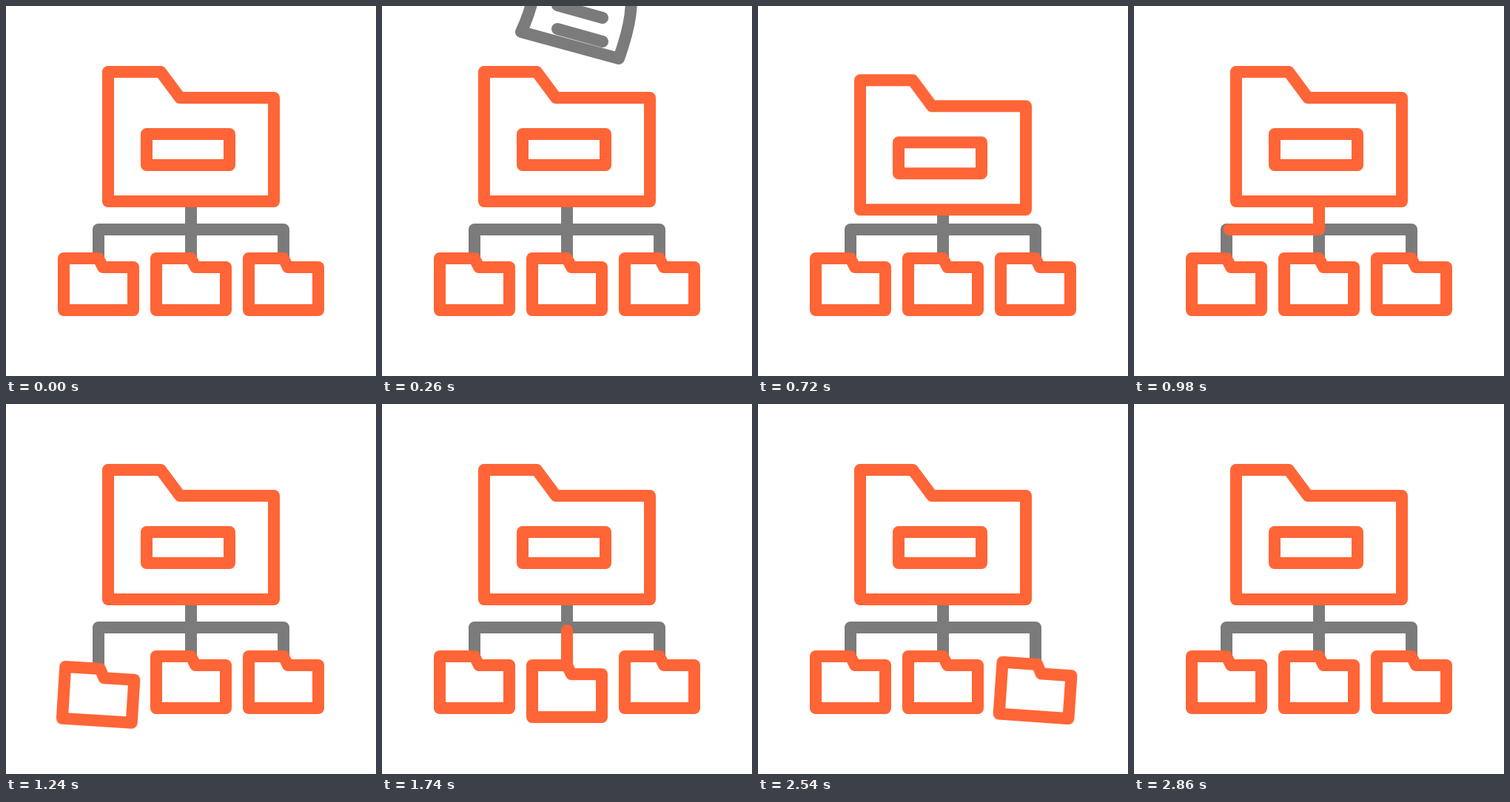
Recreate the animation shown at these times as an HTML page without scripts. Size 500 by 500 pixels, loop 3000 ms.

```html
<!DOCTYPE html>
<html lang="en">
<head>
<meta charset="utf-8">
<title>Folder tree</title>
<style>
  html, body { margin: 0; width: 100%; height: 100%; overflow: hidden; background: #fff; }
  svg { display: block; width: 100vw; height: 100vh; }
  path { fill: none; stroke-width: 16; stroke-linecap: round; stroke-linejoin: round; }
  .grey path { stroke: #7b7b7b; }
  .orange path { stroke: #ff6536; }
  path.solid, .solid path { fill: #fff; }

  /* Every part loops over 3 s and starts at its own delay. */
  .paper, .big, .dip, .tilt, .flow path {
    animation: 3s cubic-bezier(.37, 0, .63, 1) var(--at) infinite;
  }
  .paper { --at: 80ms; visibility: hidden; animation-name: fall; }
  .big { --at: 560ms; animation-name: bump; }
  .dip { animation-name: dip; }
  .tilt { animation-name: tilt; transform-origin: 125px 376px; }
  .last .dip { animation-name: dip-last; }
  .last .tilt { animation-name: tilt-last; }
  .flow path {
    stroke-dasharray: 100 300;
    stroke-dashoffset: 100;
    animation-name: flow;
    animation-timing-function: linear;
  }

  @keyframes fall {
    0% {
      visibility: visible; transform: translateY(-165px);
      animation-timing-function: cubic-bezier(.333, .25, .667, .583);
    }
    16% { visibility: visible; transform: translateY(105px); }
    16.01%, 100% { visibility: hidden; transform: translateY(105px); }
  }
  @keyframes bump {
    0%, 7.67%, 100% { transform: none; }
    3% { transform: translateY(23px); }
  }
  @keyframes dip {
    0%, 11.2%, 100% { transform: none; }
    4% { transform: translateY(27px); }
  }
  @keyframes tilt {
    0%, 2%, 22%, 100% { transform: rotate(0deg); }
    8.5% { transform: rotate(4deg); }
    18% { transform: rotate(-4deg); }
  }
  @keyframes dip-last {
    0%, 9.5%, 100% { transform: none; }
    3.83% { transform: translateY(31px); }
  }
  @keyframes tilt-last {
    0%, 1%, 17.83%, 100% { transform: rotate(0deg); }
    7% { transform: rotate(4deg); }
    13.9% { transform: rotate(-4deg); }
  }
  @keyframes flow {
    0% { stroke-dashoffset: 100; }
    4.5% { stroke-dashoffset: 0; }
    9%, 100% { stroke-dashoffset: -100; }
  }
</style>
</head>
<body>
<svg viewBox="0 0 500 500">
  <defs>
    <path id="folder" d="M78 341H125L131 353H172V411H78Z"/>
  </defs>

  <g class="grey">
    <path d="M250 264V375M125 375V302H375V375"/>
  </g>

  <g class="orange flow">
    <path style="--at:890ms" pathLength="100" d="M250 264V302H125V375"/>
    <path style="--at:1.555s" pathLength="100" d="M250 264V375"/>
    <path style="--at:2.192s" pathLength="100" d="M250 264V302H375V375"/>
  </g>

  <g class="grey paper">
    <path class="solid" d="M208 5L336 40C339 78 337 102 320 150L188 114C203 82 209 58 208 5Z"/>
    <path d="M237 46L298 62M237 78L298 95M237 110L298 127"/>
  </g>

  <g class="orange solid">
    <g class="big">
      <path d="M138 89H209L235 124H362V264H138Z"/>
      <path d="M190 173H302V215H190Z"/>
    </g>
    <g style="--at:1.03s"><g class="dip"><use class="tilt" href="#folder"/></g></g>
    <g style="--at:1.685s" transform="translate(125)"><g class="dip"><use class="tilt" href="#folder"/></g></g>
    <g style="--at:2.325s" class="last" transform="translate(250)"><g class="dip"><use class="tilt" href="#folder" style="stroke:#ff6536"/></g></g>
  </g>
</svg>
<style>
  #folder { fill: #fff; stroke: #ff6536; }
</style>
</body>
</html>
```
